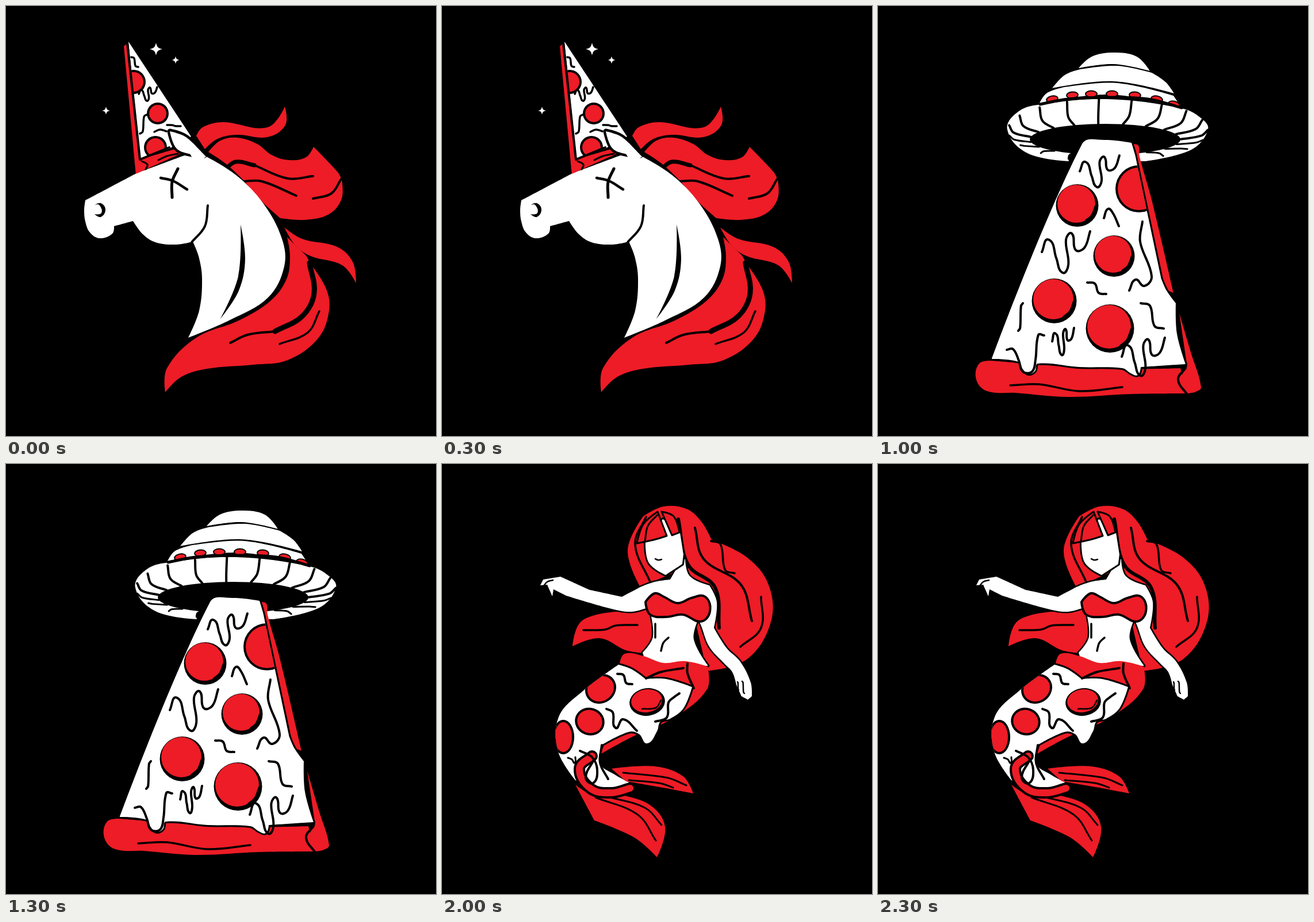
Recreate the animation shown at these times as an HTML page with a canvas. Size 748x748 px, loop 2.5 s.

```html
<!DOCTYPE html>
<html lang="en">
<head>
<meta charset="utf-8">
<title>Pizza icons</title>
<style>
html, body { margin: 0; width: 100%; height: 100%; overflow: hidden; background: #000; }
canvas { display: block; }
</style>
</head>
<body>
<canvas id="stage" width="748" height="748"></canvas>
<script>
const ctx = document.getElementById('stage').getContext('2d');
const RED = '#ed1c26', WHITE = '#fff', BLACK = '#000';
ctx.lineCap = ctx.lineJoin = 'round';

// Smooth curve through "x,y" points; a trailing "!" makes a corner.
function curve(text, closed) {
  const points = text.split(' ').map(word => {
    const [x, y] = word.split(',').map(parseFloat);
    return { x, y, sharp: word.endsWith('!') };
  });
  const n = points.length, path = new Path2D();
  const at = i => closed ? points[(i + n) % n] : points[Math.max(0, Math.min(n - 1, i))];
  const handle = (i, reach) => {
    const p = at(i), a = at(i - 1), b = at(i + 1);
    const k = p.sharp ? 0 : reach / (Math.hypot(b.x - a.x, b.y - a.y) || 1);
    return [p.x + (b.x - a.x) * k, p.y + (b.y - a.y) * k];
  };
  path.moveTo(points[0].x, points[0].y);
  for (let i = 0; i < (closed ? n : n - 1); i++) {
    const a = at(i), b = at(i + 1), reach = Math.hypot(b.x - a.x, b.y - a.y) * .36;
    path.bezierCurveTo(...handle(i, reach), ...handle(i + 1, -reach), b.x, b.y);
  }
  return path;
}

function fill(color, text) {
  const path = curve(text, true);
  ctx.fillStyle = color;
  ctx.fill(path);
  return path;
}
const red = text => fill(RED, text);
const white = text => fill(WHITE, text);
const black = text => fill(BLACK, text);

function line(text, width = 4, color = BLACK, closed = false) {
  ctx.lineWidth = width;
  ctx.strokeStyle = color;
  ctx.stroke(curve(text, closed));
}

function oval(x, y, rx, ry, angle, color) {
  ctx.beginPath();
  ctx.ellipse(x, y, rx, ry, angle * Math.PI / 180, 0, 7);
  ctx.fillStyle = color;
  ctx.fill();
}

function pepperoni([x, y, rx, ry = rx, angle = 0], rim = 4, depth = 0) {
  oval(x + depth / 2, y + depth, rx + rim, ry + rim, angle, BLACK);
  oval(x, y, rx, ry, angle, RED);
}

function cheese(text, discs) {
  const path = white(text);
  ctx.save();
  ctx.clip(path);
  discs.forEach(disc => pepperoni(disc));
  ctx.restore();
}

// Strokes of one form, each fitted to a box that starts at x, y.
const scribbles = form => (width, ...boxes) => boxes.forEach(([x, y, w, h]) =>
  line(form.map(([u, v]) => `${x + u * w},${y + v * h}`).join(' '), width));
const bends = scribbles([[0, 0], [.4, .1], [.6, .9], [1, 1]]);
const arcs = scribbles([[0, 0], [.7, .4], [1, 1]]);
const drips = scribbles([[0, .5], [.14, .2], [.3, .65], [.43, 1], [.55, .8], [.5, .2], [.62, .05], [.7, .45], [.88, .4], [1, 0]]);

function star(x, y, r) {
  const q = r * .3;
  white(`${x},${y - r}! ${x + q},${y - q} ${x + r},${y}! ${x + q},${y + q} ${x},${y + r}! ${x - q},${y + q} ${x - r},${y}! ${x - q},${y - q}`);
}

function unicorn() {
  red('331,226! 342,211 378,202 455,211 485,175! 486,207 455,228 402,224 368,231 346,249!');
  red('352,254! 373,234 402,229 437,240 462,259 492,268 522,263 535,245! 577,289 584,302! 584,335 562,362 520,372 477,369! 444,339 414,304! 382,274');
  line('381,284 400,271 432,277', 7);
  line('432,277 490,300 534,296');
  line('412,305 445,305 505,330');
  line('534,335 566,326 583,301');
  red('484,385! 515,405 576,419 603,445 609,482! 585,451 530,435 504,417');
  red('489,402! 522,434! 531,450! 557,492 562,530 543,578 490,616 430,624 350,631 305,645 277,672! 280,630 331,577 405,547 460,513 488,475 494,435');
  line('528,447 536,500 515,540 468,566', 9);
  line('468,566 420,572 390,586');
  line('545,531 525,568 476,588', 3.5);

  white('138,338! 227,291! 318,257! 345,260! 400,294 448,344 480,405 484,453 456,507 390,546 317,577! 336,530 341,474 335,435 325,410! 295,415 260,411 238,397 221,374! 188,383! 185,396 163,404 146,394 138,375 136,355');
  line('351,347 346,383 323,411');
  black('408,380! 416,440 405,495 373,544! 404,470');
  black('154,346! 165,343 173,354 165,367 154,362! 166,360 162,346');
  line('269,299 290,304 315,319', 4.5);
  line('299,283 289,306 289,333', 5);

  red('205,70! 211,65! 233,267! 300,247! 306,256! 226,292!');
  cheese('213,62! 322,227! 284,248! 234,266!', [[222, 132, 17], [264, 187, 15], [260, 246, 16]]);
  bends(3.5, [218, 89, 12, 17], [245, 189, -12, 33], [280, 207, 24, 2]);
  drips(3.5, [231, 141, 32, 24]);
  line('258,219 268,215 279,218', 3.5);
  line('211,65! 233,267! 284,246!');
  line('236,270 246,276 243,284', 3);
  line('265,268 280,261 299,257', 3);
  const ear = '285,218! 313,228 345,260! 318,257 296,247';
  line(ear, 9, BLACK, true);
  white(ear);
  white('320,257! 336,250! 348,262! 330,275!');

  star(261, 75, 11);
  star(295, 94, 6.5);
  star(174, 182, 7);
}

function lips() {
  red('177,250! 206,224 235,176 262,158 305,155 340,169! 380,156 425,163 490,200 560,258 655,317! 580,329 506,322 450,300 405,277! 360,278 315,261! 285,271 235,267');
  white('264,278! 322,263! 365,277 408,281! 440,300 476,320! 509,335! 470,338 400,331 340,320 292,306 276,294');
  line('289,274 291,291 296,308');
  line('362,277 369,300 374,326', 5);
  line('459,336 466,318');
  red('180,258! 225,283 257,317! 212,347! 205,340 200,300');
  red('652,330! 590,347 529,361! 495,393 440,429 340,486 326,515 335,537! 420,533 497,516 585,440');
  black('213,214! 217,226 212,238! 209,226');
  black('361,178! 400,169 447,189 522,256! 480,235 435,194 395,175');
  black('470,289! 535,314 602,321! 530,319');
  black('374,249! 424,288! 404,280!');
  arcs(3, [274, 267, -26, -15], [288, 264, -26, -15], [298, 255, -19, -8], [332, 264, -22, -14]);
  for (let i = 0; i < 8; i++) arcs(3.5, [448 + i * 17, 470 - i * 14, -2, 12 + i * 4]);
  arcs(3.5, [580, 377, -2, 12]);

  red('163,555! 174,537 229,515 264,490 287,486! 282,502! 220,528');
  red('303,492! 309,472! 375,437 440,408 486,370! 497,381! 400,434');
  red('130,579! 134,565 141,572!');
  cheese('225,347! 275,330 328,348! 295,378! 345,354 395,348 450,352 484,371! 465,382 434,402 405,417 376,430 345,454 309,469 302,480 302,497 295,505 289,496 285,484 264,484 232,508 180,523 157,545 158,590 153,599 149,590 147,567 138,560 126,570 131,615 122,640 115,625 113,598 103,584 106,520 145,430 182,380',
    [[251, 350, 29, 17, -32], [165, 416, 27, 18, -42], [254, 399, 33, 18, -20], [339, 406, 36, 20, -18],
     [182, 469, 34, 22, -33], [416, 360, 31, 13, -8]]);
  line('288,347 299,345 300,353 291,361');
  line('118,556 121,527 131,526 132,544 140,544 148,531');
  line('198,506 207,493 219,495 221,484 237,490 240,467 250,476 257,465');
  line('287,419 278,438 287,443 290,458 302,447 320,445');
  line('161,546 175,530 230,511 266,485 290,487');
  line('310,471 350,452 398,424 440,402 487,372');
  bends(4, [209, 376, -10, 15], [139, 457, -15, 42], [381, 418, 44, -28], [450, 380, 23, -11]);
  arcs(3, [212, 455, -23, 35], [371, 397, -21, 24]);
}

function saucer() {
  white('349,108! 372,88 410,81 450,88 473,113! 410,101');
  white('303,143! 325,120 352,110! 415,104 476,116! 500,132 515,152! 410,131');
  white('281,169! 293,152 320,142! 415,134 514,156! 528,177! 405,154');
  [[303, 162, -12], [338, 155, -5], [371, 153, 0], [407, 153, 0], [447, 155, 4], [485, 162, 12], [515, 171, 14]]
    .forEach(([x, y, angle]) => pepperoni([x, y, 9, 4.5, angle], 2));

  // Rim with evenly turned seams
  white('225,215 245,183 285,171 400,162 528,178 562,195 574,215 545,250 465,270! 332,270! 260,256');
  line('282,171 330,162 400,159 470,162 528,177', 5);
  for (let i = 0; i < 19; i++) {
    const angle = 3.63 + i * Math.PI * 2 / 19, c = Math.cos(angle), s = Math.sin(angle);
    line(`${400 + 174 * c},${216 + 54 * s} ${398 + 164 * c},${226 + 36 * s} ${395 + 131 * c},${232 + 27 * s}`, s < 0 ? 4 : 3);
  }
  oval(395, 232, 131, 27, 0, BLACK);

  red('198,617! 176,622 171,650 190,670 240,673 330,680 440,675 537,674! 526,630! 400,631');
  red('443,240! 453,243 455,262 476,337 514,499! 500,490 485,430 452,280');
  red('524,534! 545,605 562,663 553,671 538,674! 525,655 538,627!');
  line('535,630 522,650 538,676');
  line('230,660 280,658 350,670 425,663', 3.5);

  const slice = '355,240 395,233 441,238! 447,258 451,277! 493,475! 502,495 518,517! 520,570 535,623! 457,628! 452,642 440,639 425,630 350,628 278,622 273,635 262,640 252,632 245,619 198,614!';
  black('330,263! 350,237! 355,252! 338,292!');
  line(slice, 6, BLACK, true);
  cheese(slice, [[454, 318, 37]]);
  [[345, 344, 33], [409, 432, 32], [305, 510, 35], [402, 558, 38]].forEach(disc => {
    const [x, y, r] = disc;
    pepperoni(disc, 4, 3);
    line(`${x + r * .5},${y + r * .86} ${x + r * .8},${y + r * .6} ${x + r},${y + r * .1}`, 2);
  });
  drips(4, [351, 260, 69, 55], [285, 392, 84, 72], [424, 577, 75, 66], [303, 560, 38, 47]);
  bends(4, [364, 481, 33, 20], [252, 517, -8, 48], [457, 517, 40, 44]);
  line('393,369 400,353 409,361 419,383');
  line('460,375 456,410 476,470 463,487 448,476 437,495');
  line('224,598 235,597 245,617 252,636 268,636 274,615 279,572 289,573');
}

function peace() {
  red('322,108! 215,153 137,237 108,320 115,420 140,482 176,519! 193,503! 155,461 139,370 162,268 220,193 329,134! 332,120');
  cheese('327,140! 237,190 165,270 144,370 160,450 180,491! 204,500! 208,480 245,432 290,402 341,354! 345,309 333,240 334,190',
    [[273, 208, 20, 18], [201, 242, 20], [254, 287, 21], [322, 264, 18], [190, 329, 18], [308, 330, 16], [244, 361, 19, 17], [211, 430, 17]]);
  drips(3.5, [271, 208, 50, 66], [176, 345, 46, 57]);
  bends(3.5, [306, 160, 17, 25], [282, 309, -22, 26], [245, 412, 53, -22], [192, 468, 25, -15], [152, 344, 12, 101]);
  arcs(3.5, [250, 185, -9, 39]);
  line('174,295 172,280 185,276 198,284 203,297 218,298', 3.5);
  line('351,366! 302,402! 207,487!', 6, RED);
  line('191,501 170,495 161,512');
  line('114,349 120,425 154,483', 2.5);
  white('177,489! 190,488! 202,499 208,492 206,478!');

  red('373,108! 450,129 537,187 604,270 636,375 638,478! 610,455! 602,370 530,240 455,170 369,132! 362,120');
  cheese('375,138! 460,175 530,243 590,340 604,447! 512,410! 508,436 500,426 490,405 468,380! 385,353! 379,310 370,260 377,200',
    [[380, 185, 22], [468, 210, 19], [416, 237, 19], [493, 281, 20], [419, 306, 20], [565, 316, 17, 20], [485, 357, 19], [547, 383, 17], [433, 364, 17]]);
  bends(3.5, [417, 173, 18, 33], [385, 263, 10, 36], [515, 261, 28, 31], [388, 322, 22, 24]);
  line('452,239 467,254 486,240', 3.5);
  line('446,265 457,290 456,328 470,330 474,312 495,324 515,343 524,336 521,316', 3.5);
  line('573,357 590,380 592,408 579,416', 3.5);
  line('384,358! 464,384!', 6, RED);
  line('481,398! 614,452!', 6, RED);
  line('611,450 630,447 638,464', 3);
  arcs(3, [512, 183, 78, 75], [594, 266, 20, 43]);

  red('185,561! 213,543! 275,588 353,606! 361,618 351,630! 260,611');
  cheese('352,402! 349,600! 275,583 218,541! 270,490! 257,482! 285,470 315,435',
    [[317, 473, 13], [255, 508, 20], [319, 537, 15], [270, 563, 19, 17]]);
  bends(3, [324, 455, 23, -14], [288, 493, 19, 18], [332, 510, 7, -21], [235, 549, 14, -4], [303, 560, 23, 18], [338, 539, -11, 26]);
  line('347,402! 296,452!', 5, RED);
  line('259,493! 215,538!', 5, RED);
  line('187,558 210,549 214,565');

  red('597,523! 540,596 470,628 399,636! 391,550! 397,604! 490,590 577,523! 588,518');
  cheese('385,398! 456,444! 467,425 468,376! 474,382! 473,435 500,475 574,520! 490,587 405,603! 390,525',
    [[431, 440, 18], [427, 499, 20], [500, 520, 20, 18], [411, 572, 20]]);
  drips(3.5, [415, 528, 70, 48]);
  bends(3.5, [397, 420, 10, 38], [508, 561, 38, -41]);
  line('450,475 460,469 464,480 463,498 475,497 478,484', 3.5);
  black('387,388! 467,416! 470,440 455,444 387,401!');
  line('391,389! 449,414!', 4, RED);
  red('380,398! 387,420! 386,495! 397,545! 402,634! 396,632!');
  line('399,606 418,612 419,637');
  line('429,629 450,629 477,623', 3.5);
}

function mermaid() {
  red('227,317! 243,273 303,257! 362,249! 371,285 352,329! 320,324 274,303');
  red('350,91! 385,74 425,78 451,100 469,132! 530,162 568,210 572,275 530,340 461,360! 440,270! 425,180! 345,214! 323,150');
  line('440,111 455,165 520,210 539,273');
  bends(3.5, [468, 134, 41, 56], [246, 289, 94, -9]);
  line('555,231 555,285 519,318', 3.5);
  line('355,92 336,140 362,205', 3.5);
  line('411,96 428,175 475,215 482,285', 6);

  const body = '345,214! 370,205 397,201! 409,180! 423,165! 431,195 465,211! 478,240 473,285! 495,320 519,344 537,380 539,404! 532,410! 521,404! 512,384! 505,362 491,347 465,318 451,282 446,270! 438,305 463,351! 357,354! 349,328! 367,300 360,249! 330,257 295,252 216,229! 194,218! 192,230! 183,210! 171,211! 176,201! 206,196! 257,219! 313,231!';
  line(body, 5, BLACK, true);
  white(body);
  line('193,202 183,205 177,212', 2.5);
  bends(2.5, [514, 379, 2, 14], [522, 378, 4, 21]);
  const top = '354,240! 370,225 386,231 410,242 434,233 458,231 466,257 450,274 419,262 390,266 362,262';
  red(top);
  line(top, 4, BLACK, true);
  arcs(3.5, [394, 302, -13, 23], [371, 302, 0, -24]);

  const face = '354,134! 360,172 389,193! 418,174! 420,157! 413,113! 384,96!';
  line(face, 6, BLACK, true);
  white(face);
  const fringe = ['339,138! 350,105 375,83! 391,125! 368,132', '382,83! 403,91 413,119! 400,124!'];
  fringe.forEach(lock => { red(lock); line(lock, 3, BLACK, true); });
  line('353,135 358,108 374,89', 3);
  line('371,165 376,167 382,166', 2.5);

  red('309,347! 318,330 350,334 385,346 423,343 462,352! 461,392 404,441 330,475 277,504! 268,480!');
  const tail = '307,349! 330,357 354,374! 390,374 435,388! 420,425 397,443 380,448 374,465 357,486 343,470 325,466 279,488! 274,520 300,540 326,554! 280,565 232,550! 202,500 203,440 245,395';
  line(tail, 6, BLACK, true);
  cheese(tail, [[276, 391, 24, 21, -35], [257, 448, 22, 20, 20], [211, 475, 15, 26]]);
  pepperoni([356, 412, 27, 20, -8], 4, 2);
  line('348,426 372,424 381,411', 2.5);
  bends(4, [305, 365, 26, 18]);
  line('286,426 297,432 302,459 315,444 339,464');
  line('371,448 391,441 394,415 403,406 413,399');
  line('219,511 226,514 231,520 232,510', 3);
  line('355,373 380,362 420,355');
  line('427,347 427,364 438,390');

  red('295,530! 370,526 419,543 437,573! 390,564 320,552!');
  red('232,558! 262,575 302,574! 360,592 388,631 374,684! 335,650 265,620!');
  arcs(3, [315, 537, 110, 22], [325, 550, 77, 13], [267, 580, 105, 75], [285, 578, 97, 50]);
  const curl = '261,508 239,530 259,565 295,572 327,564';
  line(curl, 20);
  line(curl, 12, RED);
  line('264,515 250,545 263,555 270,532 261,510 240,499');
  line('278,489 275,520 289,548');
}

const scenes = [unicorn, lips, saucer, peace, mermaid];
let shown = -1;

function frame(now) {
  const index = Math.floor(now / 500) % scenes.length;
  if (index !== shown) {
    shown = index;
    ctx.fillStyle = BLACK;
    ctx.fillRect(0, 0, 748, 748);
    scenes[index]();
  }
  requestAnimationFrame(frame);
}
frame(performance.now());
</script>
</body>
</html>
```
